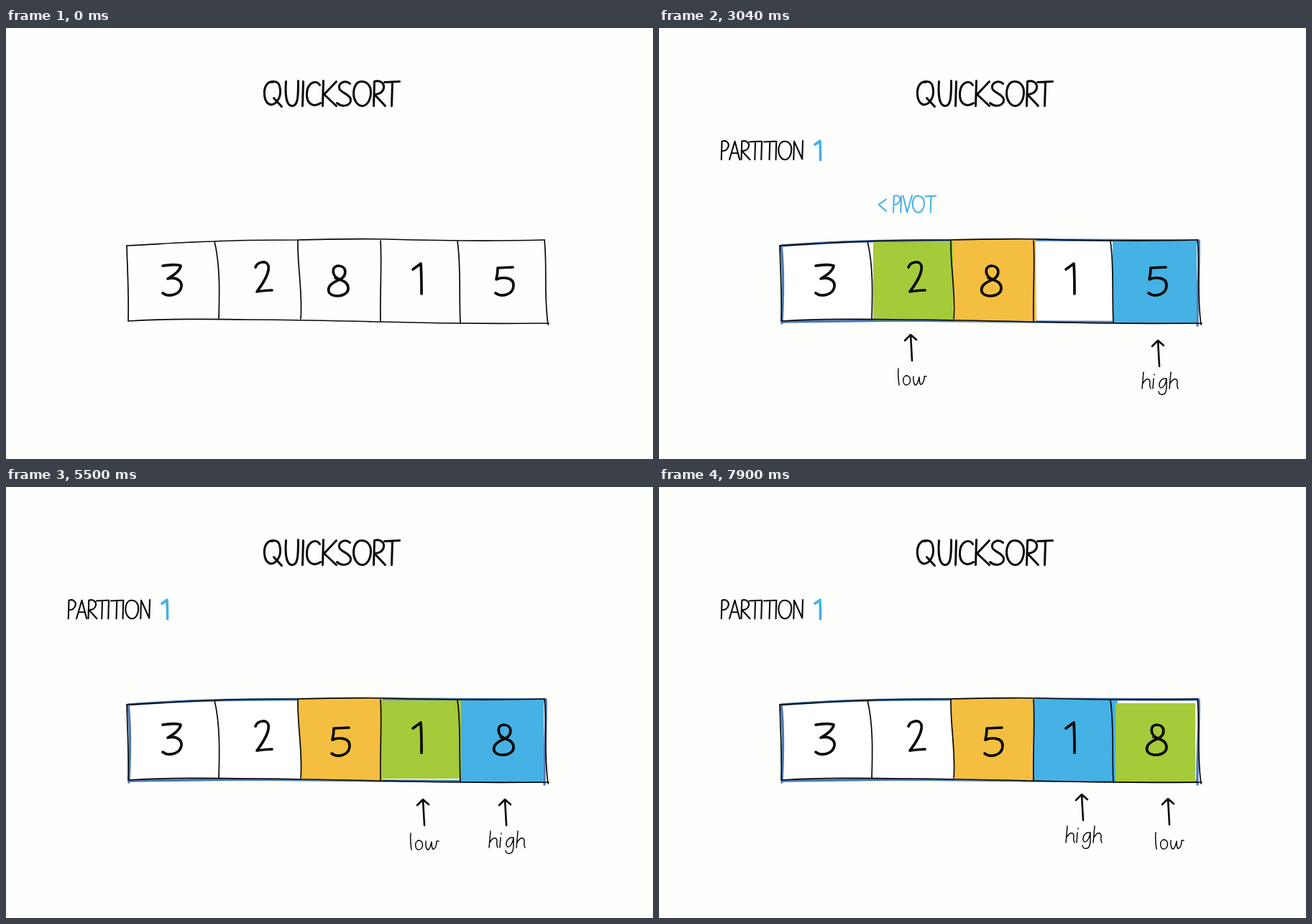
These frames come from a looping animation (900 by 600 pixels, 8 s). An HTML page:

```html
<!DOCTYPE html>
<html lang="en">
<head>
<meta charset="utf-8">
<title>Quicksort</title>
<style>
  html, body { margin: 0; width: 100%; height: 100%; overflow: hidden; background: #fefefc; }
  svg { display: block; width: 100%; height: 100%; }
  path { fill: none; stroke-linecap: round; stroke-linejoin: round; vector-effect: non-scaling-stroke; }
</style>
</head>
<body>
<svg id="stage" viewBox="0 0 900 600"></svg>
<script>
const INK = '#080808', BLUE = '#4c79b4', SKY = '#45b1e4', GREEN = '#a5ca3a', GOLD = '#f4bf40';
const LOOP = 8000;

// Pen strokes per letter: [advance, path]. Capitals are 36 high, small letters 23.
const PEN = {
  Q: [30, 'M14 1C4 0 0 10 1 20S7 34 12 33S24 24 23 13S18 0 11 2M14 24L25 36'],
  U: [24, 'M1 1C0 14 0 34 9 35S18 20 18 0'],
  I: [5, 'M1 1L0 35'],
  C: [22, 'M19 6C14 -2 2 2 1 17S10 38 20 31'],
  K: [21, 'M2 0L1 35M20 1L3 19L20 35'],
  S: [23, 'M18 4C11 -2 2 3 3 10S18 18 19 26S8 38 0 31'],
  O: [27, 'M11 1C3 1 0 10 0 18S5 35 12 35S24 26 24 16S18 1 11 1'],
  R: [16, 'M1 35L2 1C10 -2 16 4 15 10S8 19 2 19L17 35'],
  T: [22, 'M0 2L21 1M11 2L10 35'],
  P: [16, 'M1 35L2 1C11 -2 16 5 14 11S8 19 2 19'],
  A: [21, 'M0 35L10 1L19 35M4 23L16 23'],
  N: [22, 'M1 35L2 1L17 34L18 0'],
  V: [19, 'M0 1L8 35L18 0'],
  '<': [18, 'M16 8L1 19L16 32'],
  ' ': [12, ''],
  l: [6, 'M1 0C0 8 1 16 2 23'],
  o: [15, 'M7 10C0 10 0 22 6 23C13 23 14 9 5 10'],
  w: [18, 'M1 11C0 17 2 23 4 23C7 22 8 16 9 12C9 19 10 23 12 22C15 20 16 14 16 11L19 11'],
  h: [16, 'M3 0L1 23M2 16C6 8 12 8 12 14C11 18 12 21 13 23'],
  i: [6, 'M1 9L0 23M2 3L2 4'],
  g: [16, 'M12 9C4 8 0 20 5 22C10 22 12 15 13 9C13 18 14 31 8 31C5 32 2 30 2 27']
};

// Digits are drawn around their centre.
const DIGIT = {
  1: 'M-8 -13L3 -21C4 -8 4 8 4 21',
  2: 'M-11 -14C-8 -22 5 -24 7 -16C9 -6 0 8 -9 20C-2 19 6 18 12 18',
  3: 'M-13 -20C-5 -21 6 -23 12 -20C11 -13 3 -7 -6 -2C6 -5 14 1 13 9C11 21 -5 24 -13 18',
  5: 'M12 -19L-9 -18C-9 -12 -10 -6 -11 -2C-2 -6 13 -5 13 6C13 20 -4 23 -12 17',
  8: 'M3 -2C-8 -4 -11 -20 0 -21C12 -21 13 -8 3 -2C-8 2 -15 8 -13 15C-10 24 13 23 14 11C14 2 8 0 -4 -4'
};

const stage = document.getElementById('stage');

function add(parent, tag, attrs) {
  const node = document.createElementNS('http://www.w3.org/2000/svg', tag);
  for (const k in attrs) node.setAttribute(k, attrs[k]);
  return parent.appendChild(node);
}

const group = (parent, attrs = {}) => add(parent, 'g', attrs);

const stroke = (parent, d, width, color = INK) =>
  add(parent, 'path', { d, stroke: color, 'stroke-width': width });

const rect = (parent, width, height, fill) => add(parent, 'rect', { width, height, fill });

function word(parent, text, x, y, scale, width, color) {
  const g = group(parent, { 'aria-label': text, transform: `translate(${x} ${y}) scale(${scale})` });
  let pen = 0;
  for (const ch of text) {
    const [advance, d] = PEN[ch];
    if (d) stroke(g, d, width, color).setAttribute('transform', `translate(${pen} 0)`);
    pen += advance;
  }
  return g;
}

function digit(parent, n, x, y, scale = 1, width = 3.7, color = INK) {
  const g = group(parent, { 'aria-label': n, transform: `translate(${x} ${y}) scale(${scale})` });
  stroke(g, DIGIT[n], width, color);
  return g;
}

// An arrow with its tip at the origin and a label below.
function pointer(parent, text, x, y) {
  const g = group(parent);
  stroke(g, 'M2 36L0 0M-8 8L0 0L8 7', 2.6);
  word(g, text, x, y, 1, 1.5);
  return g;
}

// Scene, back to front
const marks = group(stage);
add(marks, 'polygon', { points: '170,303 290,298 521,295 749,296 752,410 521,408 170,407', fill: '#fff' });
stroke(marks, 'M171 411C173 370 173 330 170 303C220 299 290 296 360 296L521 295L751 296C752 330 748 370 749 414M172 409L340 407L521 409L749 410', 3.4, BLUE);
add(marks, 'polygon', { points: '406,295 524,294 525,409 411,408', fill: GOLD });
const highCell = rect(marks, 117, 114, SKY);
const lowCell = rect(marks, 111, 109, GREEN);

stroke(stage, 'M168 303C210 301 250 298 290 297C330 295 365 295 406 295C450 294 490 293 530 294C600 296 680 297 749 295', 1.6);
stroke(stage, 'M168 303C169 340 171 370 170 408C220 405 290 405 340 406C400 406 460 408 521 409C590 411 670 412 755 411', 1.7);
stroke(stage, 'M749 295C753 335 748 370 754 413', 1.7);
stroke(stage, 'M290 297C298 330 297 370 296 405M406 295C405 330 413 370 410 405M521 296C523 330 520 370 521 409M628 297C633 330 630 370 632 410', 1.7);

digit(stage, 3, 231, 351);
digit(stage, 2, 358, 347);
digit(stage, 1, 574, 349);
const before = group(stage), after = group(stage);
digit(before, 8, 462, 352);
digit(before, 5, 693, 352);
digit(after, 5, 465, 354);
digit(after, 8, 692, 352);

word(stage, 'QUICKSORT', 358.5, 73.5, 1, 3);

const notes = group(stage);
word(notes, 'PARTITION', 86, 157, 0.75, 2.1);
digit(notes, 1, 222, 170.5, 0.63, 3.6, SKY);
const low = pointer(notes, 'low', -18, 47);
const high = pointer(notes, 'high', -23, 44);
const pivot = word(group(notes), '< PIVOT', 0, 0, 0.68, 2, SKY).parentNode;

// Motion
function ease(t, from, to) {
  const p = Math.min(1, Math.max(0, (t - from) / (to - from)));
  return p * p * (3 - 2 * p);
}

// Starts at one point, then eases to each following stop [from, to, x, y].
function track(t, [x, y], stops) {
  for (const [from, to, nx, ny] of stops) {
    const p = ease(t, from, to);
    x += (nx - x) * p;
    y += (ny - y) * p;
  }
  return [x, y];
}

const place = (node, [x, y]) => node.setAttribute('transform', `translate(${x.toFixed(2)} ${y.toFixed(2)})`);
const fade = (node, value) => node.setAttribute('opacity', value.toFixed(3));
const pulse = (t, a, b, c, d) => ease(t, a, b) - ease(t, c, d);

const STEP1 = [1940, 2100], STEP2 = [3040, 3200], STEP3 = [5340, 5500];
const MEET = [6000, 6400], CROSS = [7640, 7900];

function draw(t) {
  const shown = ease(t, 40, 840);
  fade(marks, shown);
  fade(notes, shown);

  place(lowCell, track(t, [175, 298], [
    [...STEP1, 298, 298], [...STEP2, 410, 299], [...STEP3, 522, 297], [...CROSS, 635, 301]
  ]));
  place(highCell, track(t, [631, 296], [[...MEET, 521, 295]]));
  place(low, track(t, [235, 426], [
    [...STEP1, 350, 427], [...STEP2, 466, 431], [...STEP3, 580, 435], [...MEET, 556, 434], [...CROSS, 708, 434]
  ]));
  place(high, track(t, [694, 435], [[...MEET, 607, 433], [...CROSS, 588, 428]]));

  place(pivot, track(t, [190, 241], [
    [...STEP1, 305, 233], [...STEP2, 420, 225], [...STEP3, 534, 217.5]
  ]));
  fade(pivot, pulse(t, 1510, 1600, ...STEP1) + pulse(t, 2610, 2700, ...STEP2) + pulse(t, 6840, 6900, ...CROSS));

  const swapped = ease(t, 3840, 4100);
  fade(before, 1 - swapped);
  fade(after, swapped);
}

const start = performance.now();
function tick() {
  draw((performance.now() - start) % LOOP);
  requestAnimationFrame(tick);
}
tick();
</script>
</body>
</html>
```
